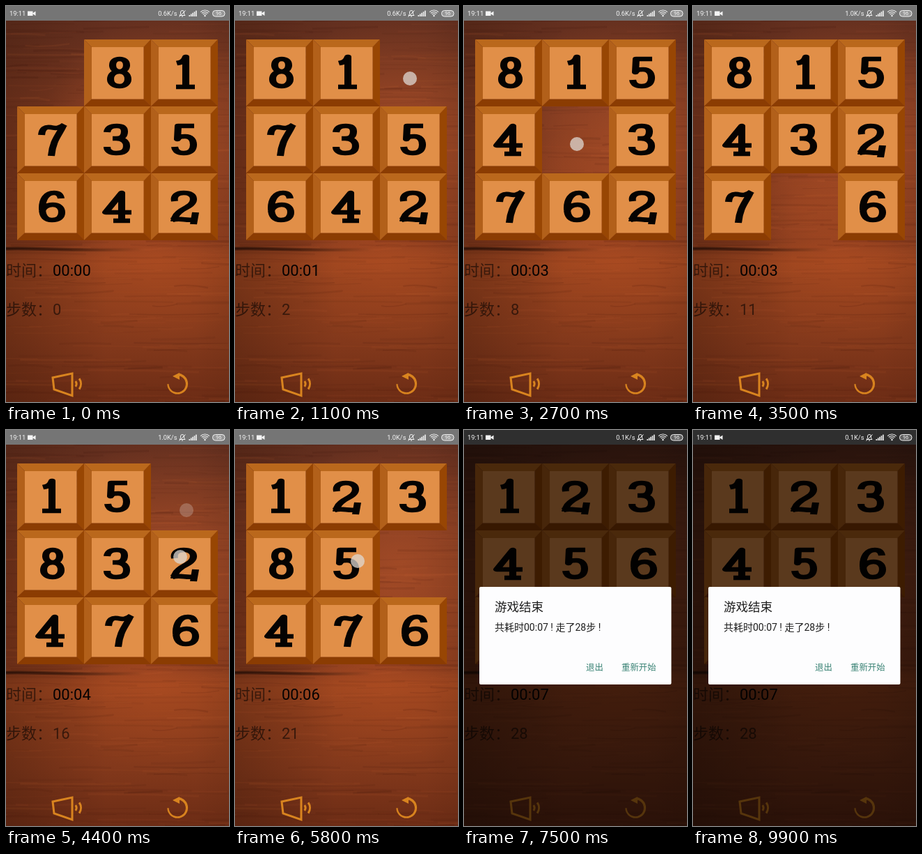
Recreate the animation shown at these times as an HTML page with a canvas. Size 320 px wide and 568 px high, loop 10000 ms.

```html
<!DOCTYPE html>
<html lang="zh-CN">
<head>
<meta charset="utf-8">
<title>数字拼图</title>
<style>
html, body { margin: 0; width: 320px; height: 568px; overflow: hidden; background: #6a2c16; }
canvas { display: block; }
</style>
</head>
<body>
<canvas id="stage" width="320" height="568"></canvas>
<script>
const W = 320, H = 568, LOOP = 10000, TILE = 96, LEFT = 16, TOP = 48;
const ctx = document.getElementById('stage').getContext('2d');
const SANS = 'Roboto, "Noto Sans CJK SC", "Noto Sans CJK", sans-serif';

const START = [0, 8, 1, 7, 3, 5, 6, 4, 2];

// [time, tile, tap offset x, tap offset y]
const MOVES = [
  [800, 8, 4, 6], [1100, 1, -5, 8], [1400, 5, 2, -4], [1700, 3, 8, 3],
  [2100, 4, -3, -1], [2300, 6, 6, 4], [2500, 7, 31, 0], [2700, 4, 2, 6],
  [2900, 3, -8, 4], [3100, 2, -4, 2], [3300, 6, 5, 3],
  [3700, 7, 8, 2], [3800, 4, 6, 4], [4000, 8, 10, 6], [4100, 1, 22, -8], [4300, 5, 3, 19],
  [4500, 2, -6, -10], [4800, 3, 8, -4], [5100, 5, 6, 0], [5300, 2, -6, 4], [5600, 3, 0, -6],
  [5900, 5, 16, -4], [6100, 8, 12, 2], [6300, 4, 14, -6], [6500, 7, 4, 4],
  [6700, 8, 8, -2], [6900, 5, -8, 2], [7000, 6, -4, 4]
];

// Numeral centre lines in tile coordinates, drawn with a broad oval pen
const DIGITS = {
  1: 'M37 34C44 33 48 31 50 25V68M36 68H63',
  2: 'M34 40C32 32 38 28 47 28C56 28 61 31 61 37C61 45 52 48 44 53C38 57 34 61 33 69M30 67C42 63 52 69 63 66M64 56L61 73',
  3: 'M33 37C34 30 40 28 47 28C55 28 58 31 58 36C58 42 55 46 46 46H41M46 46C57 46 61 51 61 57C61 64 56 67 46 67C38 67 33 64 33 58',
  4: 'M54 68V28L31 56H68M42 68H66',
  5: 'M62 28H39L38 47C40 43 44 43 49 43C57 43 61 48 61 55C61 63 56 67 47 67C39 67 35 64 34 58',
  6: 'M63 36C62 30 58 28 53 28C42 28 36 37 36 50C36 62 41 67 50 67C59 67 64 63 64 56C64 49 59 45 51 45C43 45 37 49 36 54',
  7: 'M35 41C36 31 41 29 48 30C56 32 62 31 68 26M66 28C61 40 51 48 49 71',
  8: 'M51 28C57 28 61 31 61 37C61 42 57 46 51 46C45 46 41 42 41 37C41 31 45 28 51 28Z' +
     'M51 46C58 46 63 50 63 57C63 63 58 67 51 67C43 67 38 63 38 57C38 50 43 46 51 46Z'
};
const PEN = { size: 6.5, stretch: 1.55 };
const GLYPHS = {};
for (const n in DIGITS) {
  GLYPHS[n] = new Path2D();
  GLYPHS[n].addPath(new Path2D(DIGITS[n]), new DOMMatrix().scale(1 / PEN.stretch, 1));
}

function poly(pts, color) {
  ctx.beginPath();
  pts.forEach(([x, y]) => ctx.lineTo(x, y));
  ctx.closePath();
  ctx.fillStyle = color;
  ctx.fill();
}

function text(str, x, y, size, color, weight = 400) {
  ctx.font = `${weight} ${size}px ${SANS}`;
  ctx.fillStyle = color;
  ctx.fillText(str, x, y);
}

function disc(x, y, r, color) {
  ctx.fillStyle = color;
  ctx.beginPath();
  ctx.arc(x, y, r, 0, 7);
  ctx.fill();
}

function arc(x, y, r, a, b, width) {
  ctx.lineWidth = width;
  ctx.beginPath();
  ctx.arc(x, y, r, a, b);
  ctx.stroke();
}

function makeWood() {
  const c = document.createElement('canvas');
  c.width = W;
  c.height = H;
  const g = c.getContext('2d');
  let seed = 11;
  const rnd = () => (seed = seed * 16807 % 2147483647) / 2147483647;
  const wash = (fill, ...stops) => {
    stops.forEach(s => fill.addColorStop(...s));
    g.fillStyle = fill;
    g.fillRect(0, 0, W, H);
  };
  const glow = (x, y, r, rgb, a) =>
    wash(g.createRadialGradient(x, y, 5, x, y, r), [0, `rgba(${rgb},${a})`], [1, `rgba(${rgb},0)`]);

  wash(g.createLinearGradient(0, 21, 0, H),
    [0, '#632f1f'], [.2, '#783720'], [.42, '#7e381d'], [.58, '#82391d'],
    [.63, '#9c451f'], [.72, '#903f1d'], [.85, '#82381b'], [1, '#6c2c15']);
  wash(g.createLinearGradient(0, 0, W, 0),
    [0, 'rgba(50,20,8,.32)'], [.45, 'rgba(50,20,8,0)'], [.85, 'rgba(50,20,8,0)'], [1, 'rgba(50,20,8,.08)']);
  glow(235, 200, 190, '190,88,44', .55);
  glow(160, 290, 110, '180,80,36', .25);
  glow(220, 365, 130, '190,82,34', .3);

  for (let i = 0; i < 330; i++) {
    const y = 21 + rnd() * 547, x = rnd() * 360 - 60, len = 30 + rnd() * 130;
    const tilt = (rnd() - .5) * 6, bend = (rnd() - .5) * 7;
    g.strokeStyle = rnd() < .6 ? `rgba(50,16,6,${.03 + rnd() * .09})` : `rgba(205,105,55,${.03 + rnd() * .07})`;
    g.lineWidth = .8 + rnd() * 2.6;
    g.beginPath();
    g.moveTo(x, y);
    g.quadraticCurveTo(x + len / 2, y + bend, x + len, y + tilt);
    g.stroke();
  }

  // Dark seam under the board
  const fade = g.createLinearGradient(0, 0, 200, 0);
  fade.addColorStop(0, 'rgba(25,8,3,.55)');
  fade.addColorStop(.4, 'rgba(25,8,3,.4)');
  fade.addColorStop(1, 'rgba(25,8,3,0)');
  g.strokeStyle = fade;
  for (const width of [1.5, 5]) {
    g.lineWidth = width;
    g.beginPath();
    g.moveTo(0, 348);
    g.bezierCurveTo(40, 346, 80, 352, 200, 349);
    g.stroke();
  }
  return c;
}
const wood = makeWood();

function drawTile(n, cell) {
  const s = TILE, b = 11, e = s - 10.5;
  ctx.save();
  ctx.translate(LEFT + cell % 3 * s, TOP + Math.floor(cell / 3) * s);
  poly([[0, 0], [s, 0], [e, b], [b, b]], '#ba681c');
  poly([[0, 0], [b, b], [b, e], [0, s]], '#b2601a');
  poly([[s, 0], [s, s], [e, e], [e, b]], '#984603');
  poly([[0, s], [b, e], [e, e], [s, s]], '#8b3c02');
  ctx.fillStyle = '#e18f48';
  ctx.fillRect(b, b, e - b, e - b);
  ctx.scale(PEN.stretch, 1);
  ctx.strokeStyle = '#050302';
  ctx.lineWidth = PEN.size;
  ctx.lineJoin = 'round';
  ctx.stroke(GLYPHS[n]);
  ctx.restore();
}

function drawButtons() {
  ctx.strokeStyle = '#d9841f';
  ctx.lineJoin = 'miter';
  ctx.lineWidth = 3;
  ctx.beginPath();
  [[67, 533], [95, 527], [95, 559], [69, 550]].forEach(p => ctx.lineTo(...p));
  ctx.closePath();
  ctx.stroke();
  arc(94, 542, 7, -.6, .6, 3);
  arc(94, 542, 13.5, -.6, .6, 3);

  // Arc that thins toward its tail
  const steps = 24, from = -1.4, sweep = 4.5;
  for (let i = 0; i < steps; i++) {
    const a = from + sweep * i / steps;
    arc(246, 542, 13.5, a, a + sweep / steps + .03, 3.6 - 1.4 * i / steps);
  }
  poly([[239, 531], [249, 526], [249, 536]], '#d9841f');
}

function drawStatus(t) {
  const white = '#f4f4f4';
  const speed = t < 2800 ? '0.6K/s' : t < 6800 ? '1.0K/s' : '0.1K/s';
  text('19:11', 5, 14, 9.3, white);
  ctx.fillStyle = white;
  ctx.fillRect(31, 7.5, 7.5, 6.5);
  poly([[38, 10.5], [42.5, 7.5], [42.5, 14], [38, 11]], white);
  ctx.textAlign = 'right';
  text(speed, 245.5, 14, 9.3, white);
  ctx.textAlign = 'left';

  // Muted bell
  ctx.strokeStyle = white;
  ctx.lineWidth = 1;
  ctx.beginPath();
  ctx.moveTo(249, 13.5);
  ctx.lineTo(250.5, 11.5);
  ctx.lineTo(250.5, 9);
  ctx.arc(253, 9, 2.5, Math.PI, 0);
  ctx.lineTo(255.5, 11.5);
  ctx.lineTo(257, 13.5);
  ctx.closePath();
  ctx.moveTo(257.5, 6.5);
  ctx.lineTo(248.5, 15.5);
  ctx.moveTo(252, 15);
  ctx.lineTo(254, 15);
  ctx.stroke();

  ctx.fillStyle = white;
  for (let i = 0; i < 5; i++) ctx.fillRect(262.5 + i * 2.4, 13 - i * 1.6, 1.6, 2 + i * 1.6);

  for (const r of [4, 6.5, 9]) arc(285.5, 15, r, -2.35, -.79, 1.2);
  disc(285.5, 14, 1.2, white);

  ctx.lineWidth = 1;
  ctx.beginPath();
  ctx.roundRect(296.5, 6.5, 17.5, 8.5, 4);
  ctx.fillStyle = 'rgba(255,255,255,.25)';
  ctx.fill();
  ctx.stroke();
  ctx.textAlign = 'center';
  text('96', 305.3, 13.3, 7, white);
  ctx.textAlign = 'left';
}

function drawDialog(p) {
  ctx.fillStyle = `rgba(0,0,0,${.6 * p})`;
  ctx.fillRect(0, 0, W, H);
  ctx.save();
  ctx.globalAlpha = p;
  ctx.fillStyle = '#fdfdfe';
  ctx.beginPath();
  ctx.roundRect(22, 225, 275.5, 140, 2);
  ctx.fill();
  text('游戏结束', 44, 260, 17.5, '#1e1e1e', 500);
  text('共耗时00:07 ! 走了28步 !', 44, 288, 14, '#1e1e1e');
  text('退出', 175, 345, 12.4, '#3a8375', 500);
  text('重新开始', 226, 345, 12.4, '#3a8375', 500);
  ctx.restore();
}

function draw(t) {
  const board = START.slice(), taps = [];
  let steps = 0;
  for (const [at, n, dx, dy] of MOVES) {
    const cell = board.indexOf(n);
    if (t >= at - 100 && t < at + 150) {
      const x = LEFT + (cell % 3 + .5) * TILE + dx;
      const y = TOP + (Math.floor(cell / 3) + .5) * TILE + dy;
      taps.push([x, y, t < at + 50 ? .74 : .28]);
    }
    if (t < at) break;
    board[board.indexOf(0)] = n;
    board[cell] = 0;
    steps++;
  }
  const secs = Math.min(7, Math.floor((t + 350) / 1000));

  ctx.drawImage(wood, 0, 0);
  ctx.fillStyle = '#757575';
  ctx.fillRect(0, 0, W, 21);
  board.forEach((n, cell) => n && drawTile(n, cell));

  const faded = 'rgba(0,0,0,.56)';
  text('时间：', 0, 387, 22, faded);
  text('00:0' + secs, 67, 387, 22, '#050202');
  text('步数：', 0, 443, 22, faded);
  text(String(steps), 67, 443, 22, faded);
  drawButtons();

  for (const [x, y, a] of taps) disc(x, y, 10, `rgba(222,217,212,${a})`);

  const shown = Math.max(0, Math.min(1, (t - 7000) / 200));
  if (shown) drawDialog(shown);
  drawStatus(t);
}

const begin = performance.now();
function tick() {
  const t = (performance.now() - begin) % LOOP;
  draw(Math.floor(t / 100) * 100);
  requestAnimationFrame(tick);
}
tick();
</script>
</body>
</html>
```
